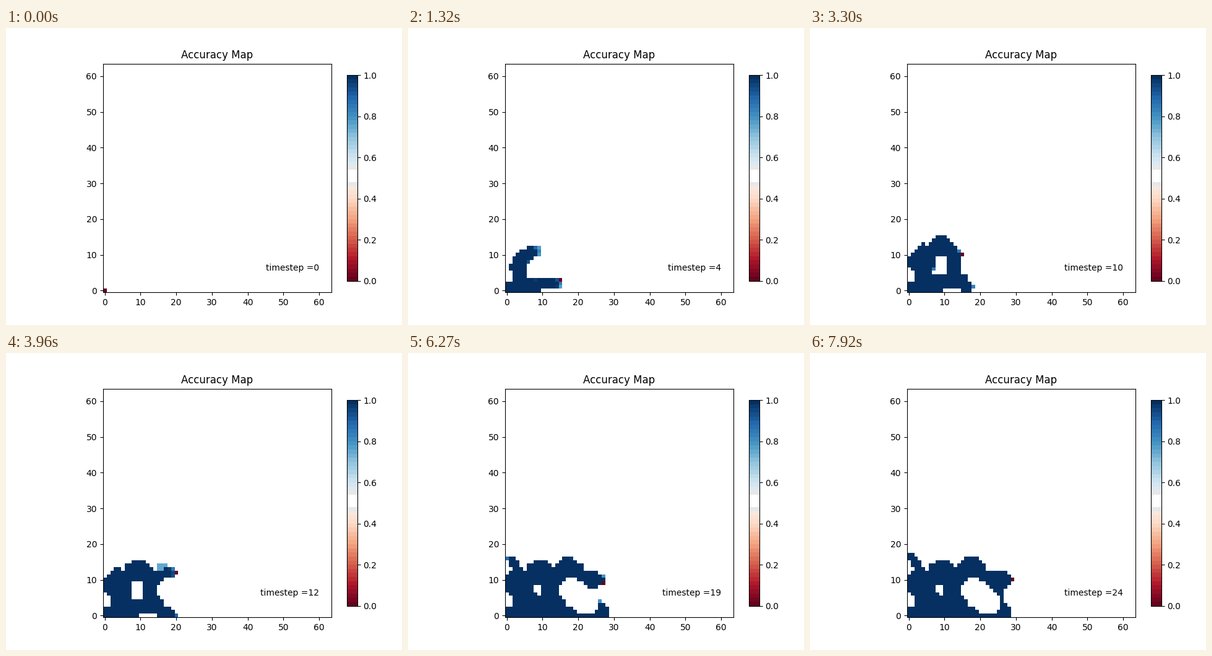
These frames come from a looping animation (640x480 px, 8 s). A matplotlib script:

```python
import numpy as np
import matplotlib.pyplot as plt
from matplotlib.animation import FuncAnimation
from matplotlib.colors import ListedColormap

SIZE = 64
LOOP, TICK, STEP = 8000, 40, 330  # ms
LAST = LOOP // STEP
BRUSH = 1.6   # cells around a walker reached at once
SPREAD = 4    # steps per cell beyond the brush

y, x = np.mgrid[:SIZE, :SIZE].astype(float)

# walkers as (step, x, y) key points
WALKERS = [
    # along the floor, then up the right side
    [(0, 0, 1), (2, 8, 1), (4, 14, 2), (9, 15.5, 1.5), (12, 18.8, -.6),
     (16, 26, 0), (18, 27, 1.5), (20, 26.5, 4), (21, 25, 7)],
    # up the tower, over the arch, then along the upper arm
    [(0, 2, 1), (1, 3.5, 8), (3, 5, 10), (4, 8, 11), (5, 9, 12.5),
     (6, 11, 11), (7, 12.5, 8.5), (8, 12.5, 6), (10, 13.5, 10),
     (12, 18.5, 12), (16, 24.3, 10), (20, 26.3, 10), (22, 27, 10)],
    # the two late peaks
    [(12, 16, 13), (16, 17, 14), (22, 18, 15)],
    [(16, 3, 13), (20, .5, 16)],
]

# ellipses kept free: x, y, x radius, y radius, slant, closing step
NEVER = LAST + 1
POCKETS = [
    (-.3, 4.3, 2, 2.1, 0, NEVER),
    (0, 13.3, 1.05, 1.9, 0, NEVER),
    (8.6, 7.4, .95, 1.6, 0, NEVER),
    (20.05, 5.4, 4.85, 4.9, .47, NEVER),
    (9, 7, 1.7, 2.8, 0, 13.5),
    (12, -.3, 2.8, .9, 0, 12.5),
]


def hump(mid, height, half):
    return height * np.clip(1 - ((x - mid) / half) ** 2, 0, None)


def inside():
    """Largest area the walkers can fill."""
    top = 12.05 + hump(.6, 5.4, 3.9) + np.maximum(
        hump(9.2, 3.6, 4.8), hump(17.5, 4.4, 4.9))
    right = (26.4 + 3 * np.exp(-((y - 10.2) / 1.9) ** 2)
             + np.clip(4 - y, 0, 2))
    return (y <= top) & (x <= right)


def reach_times():
    """Time at which each cell is first reached."""
    times = np.full((SIZE, SIZE), np.inf)
    for keys in WALKERS:
        t, px, py = np.transpose(keys)
        for s in np.linspace(t[0], t[-1], int(t[-1] - t[0]) * 20 + 1):
            dist = np.hypot(x - np.interp(s, t, px), y - np.interp(s, t, py))
            late = SPREAD * np.clip(dist - BRUSH, 0, None)
            times = np.minimum(times, s + late)
    times = np.maximum(times, .01)
    for cx, cy, rx, ry, slant, closing in POCKETS:
        u = (x - cx + slant * (y - cy)) / rx
        v = (y - cy) / ry
        free = u * u + v * v < 1
        times[free] = np.maximum(times[free], closing)
    times[~inside()] = np.inf
    times[0, 0] = 0
    return times


reached = reach_times()


def make_grid(step):
    """Accuracy rises quickly with age; the newest cell is at zero."""
    seen = reached <= step
    age = np.where(seen, step - reached, np.inf)
    grid = np.where(seen, np.minimum(.75 + .5 * age, 1), np.nan)
    grid[np.unravel_index(age.argmin(), age.shape)] = 0
    return np.ma.masked_invalid(grid)


def banded_cmap(bands=50):
    colors = plt.get_cmap("RdBu")(np.linspace(0, 1, bands))
    colors[23:28, :3] = 0.91
    colors[24:27, :3] = 1
    cmap = ListedColormap(colors)
    cmap.set_bad("white")
    return cmap


grids = [make_grid(step) for step in range(LAST + 1)]

fig, ax = plt.subplots(figsize=(6.4, 4.8), dpi=100)
image = ax.imshow(grids[0], cmap=banded_cmap(), vmin=0, vmax=1,
                  origin="lower", interpolation="nearest")
ax.set_title("Accuracy Map", x=0.498)
fig.colorbar(image, ax=ax, fraction=0.05, pad=0.05, shrink=0.9)
label = ax.text(60, 5, "", ha="right", va="bottom")


def update(i):
    step = (i * TICK + TICK - 10) // STEP
    image.set_data(grids[step])
    label.set_text(f"timestep ={step}")
    return image, label


anim = FuncAnimation(fig, update, frames=LOOP // TICK, interval=TICK,
                     init_func=lambda: update(0), repeat=True, repeat_delay=0)
plt.show()
```
